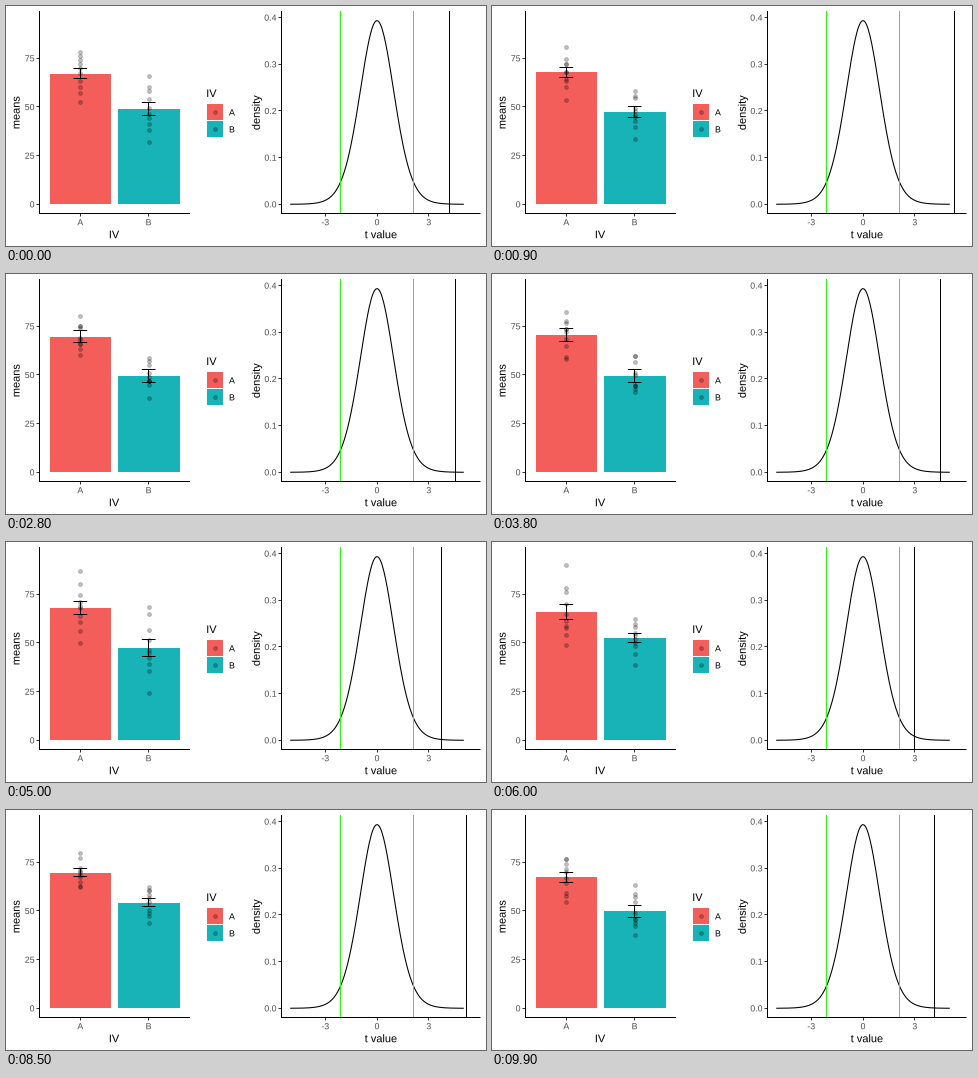
Animation, 480 px wide and 240 px high, one loop 10000 ms. Source, as a matplotlib script:

```python
import math

import matplotlib.pyplot as plt
import numpy as np
from matplotlib.animation import FuncAnimation
from matplotlib.patches import PathPatch, Rectangle
from matplotlib.textpath import TextPath
from matplotlib.transforms import Affine2D

W, H, DPI = 480, 240, 100
PX = 72 / DPI  # points per pixel
RED, TEAL, GREEN = "#F35E5A", "#17B3B7", "#21FF06"
TOP, BOTTOM, ZERO = 5.5, 207.5, 198.3
CENTERS = np.array([74.3, 142.7])
BAR_W, CAP_W = 61.6, 13.7
N, DF, T_CRIT = 10, 18, 2.101

plt.rcParams.update({
    "font.family": "Liberation Sans",
    "path.snap": False,
    "lines.solid_capstyle": "projecting",
})


def mean_y(v):
    return ZERO - 1.947 * np.asarray(v)


def dens_y(d):
    return ZERO - 466.8 * np.asarray(d)


def t_x(t):
    return 371 + 17.25 * np.asarray(t)


def t_density(t):
    c = math.gamma((DF + 1) / 2) / (math.sqrt(DF * math.pi) * math.gamma(DF / 2))
    return c * (1 + t ** 2 / DF) ** (-(DF + 1) / 2)


def crisp(v):
    """Centre of the pixel that holds v."""
    return np.floor(v) + 0.5


# Key poses, one per experiment: means of A and B, standard errors of A and B
MEANS = np.array([(67.1, 49.0), (67.9, 47.0), (65.7, 48.4), (71.7, 50.0),
                  (70.0, 49.1), (68.0, 47.4), (66.0, 52.3), (69.0, 50.0),
                  (69.9, 54.4), (67.7, 53.6)])
ERRORS = np.array([(2.70, 3.36), (2.70, 2.70), (2.86, 2.86), (3.20, 3.40),
                   (3.20, 3.45), (3.50, 4.25), (4.00, 2.30), (2.90, 2.90),
                   (1.90, 2.14), (2.60, 2.45)])
T_VALUES = (MEANS[:, 0] - MEANS[:, 1]) / np.hypot(*ERRORS.T)

# Ten scores per group, roughly normal, with exactly these means and errors
rng = np.random.default_rng(18)
z = np.sort(rng.normal(size=(4, len(MEANS), 2, N))).mean(axis=0)
z -= z.mean(axis=-1, keepdims=True)
z /= z.std(axis=-1, ddof=1, keepdims=True)
SCORES = (MEANS[..., None]
          + math.sqrt(N) * ERRORS[..., None] * rng.permuted(z, axis=-1))

fig = plt.figure(figsize=(W / DPI, H / DPI), dpi=DPI, facecolor="white")
ax = fig.add_axes([0, 0, 1, 1])
ax.set(xlim=(0, W), ylim=(H, 0))
ax.axis("off")


def line(x, y, color="black", z=3, width=1.0, **kw):
    return ax.plot(x, y, color=color, lw=width * PX, zorder=z, **kw)[0]


def label(x, y, s, size=8.8, color="#4D4D4D", align=0.5, angle=0):
    """Text on baseline y; align is the share of its width left of x."""
    path = TextPath((0, 0), s, size=size)
    move = Affine2D().translate(-align * (path.get_extents().x1 + path.get_extents().x0
                                          if align == 0.5
                                          else path.get_extents().x1), 0)
    place = Affine2D().rotate_deg(angle).scale(1, -1).translate(x, y)
    ax.add_patch(PathPatch((move + place).transform_path(path),
                           facecolor=color, lw=0, zorder=4))


def title(x, y, s, **kw):
    label(x, y, s, size=11, color="black", **kw)


def dots(x, y):
    return ax.scatter(x, y, s=(3.9 * PX) ** 2, facecolor="black",
                      edgecolor="black", linewidths=0.7 * PX, alpha=0.25, zorder=5)


def panel(left, right, x_ticks, y_ticks, x_title, y_title, title_x):
    line([left, left], [TOP, BOTTOM], z=6)
    line([left, right], [BOTTOM, BOTTOM], z=6)
    for x, s in x_ticks:
        line([crisp(x)] * 2, [BOTTOM, BOTTOM + 2.5], "#333333")
        label(x, 219.2, s)
    for y, s in y_ticks:
        line([left - 2.5, left], [crisp(y)] * 2, "#333333")
        label(left - 5.3, y + 3.1, s, align=1)
    title((left + right) / 2, 232.2, x_title)
    title(title_x, 106.5, y_title, angle=90)


panel(33.5, 183.5, zip(CENTERS, "AB"),
      [(mean_y(v), str(v)) for v in (0, 25, 50, 75)], "IV", "means", 13.6)
panel(275.5, 474, [(t_x(v), str(v)) for v in (-3, 0, 3)],
      [(dens_y(v / 10), f"{v / 10:.1f}") for v in range(5)],
      "t value", "density", 253.8)

# Legend
title(200.2, 91, "IV", align=0)
for y, s, color in ((98, "A", RED), (115, "B", TEAL)):
    ax.add_patch(Rectangle((201, y), 16, 16, facecolor=color, lw=0))
    dots([209], [y + 8])
    label(223, y + 11.4, s, color="black", align=0)

# Sampling distribution with critical values
grid = np.linspace(-5, 5, 201)
line(t_x(grid), dens_y(t_density(grid)), width=1.07)
for t in (-T_CRIT, T_CRIT):
    line([crisp(t_x(t))] * 2, [TOP, BOTTOM], GREEN, 4)
t_line = line([0, 0], [TOP, BOTTOM], z=5)

bars, whiskers = [], []
for cx, color in zip(CENTERS, (RED, TEAL)):
    left, right = np.round([cx - BAR_W / 2, cx + BAR_W / 2])
    bars.append(ax.add_patch(
        Rectangle((left, round(ZERO)), right - left, 0, facecolor=color, lw=0)))
    whiskers.append(line([], [], z=4, solid_capstyle="butt"))
dot_x = np.repeat(CENTERS, N)
scores = dots(dot_x, np.zeros_like(dot_x))


def draw(i):
    k, step = divmod(i, 10)
    hold = 3 if k == 0 else 4
    p = max(0, step - hold) / (10 - hold)

    def tween(values):
        return (1 - p) * values[k] + p * values[(k + 1) % len(values)]

    for cx, m, e, bar, whisker in zip(CENTERS, tween(MEANS), tween(ERRORS),
                                      bars, whiskers):
        bar.set_height(np.round(mean_y(m)) - round(ZERO))
        lo, hi = crisp(mean_y(m - e)), crisp(mean_y(m + e))
        l, mid, r = cx - CAP_W / 2, crisp(cx), cx + CAP_W / 2
        whisker.set_data([l, r, np.nan, mid, mid, np.nan, l, r],
                         [hi, hi, np.nan, hi, lo, np.nan, lo, lo])
    scores.set_offsets(np.column_stack([dot_x, mean_y(tween(SCORES)).ravel()]))
    t_line.set_xdata([crisp(t_x(tween(T_VALUES)))] * 2)
    return [*bars, *whiskers, scores, t_line]


anim = FuncAnimation(fig, draw, frames=100, interval=100, repeat=True,
                     repeat_delay=0, blit=False)
plt.show()
```
